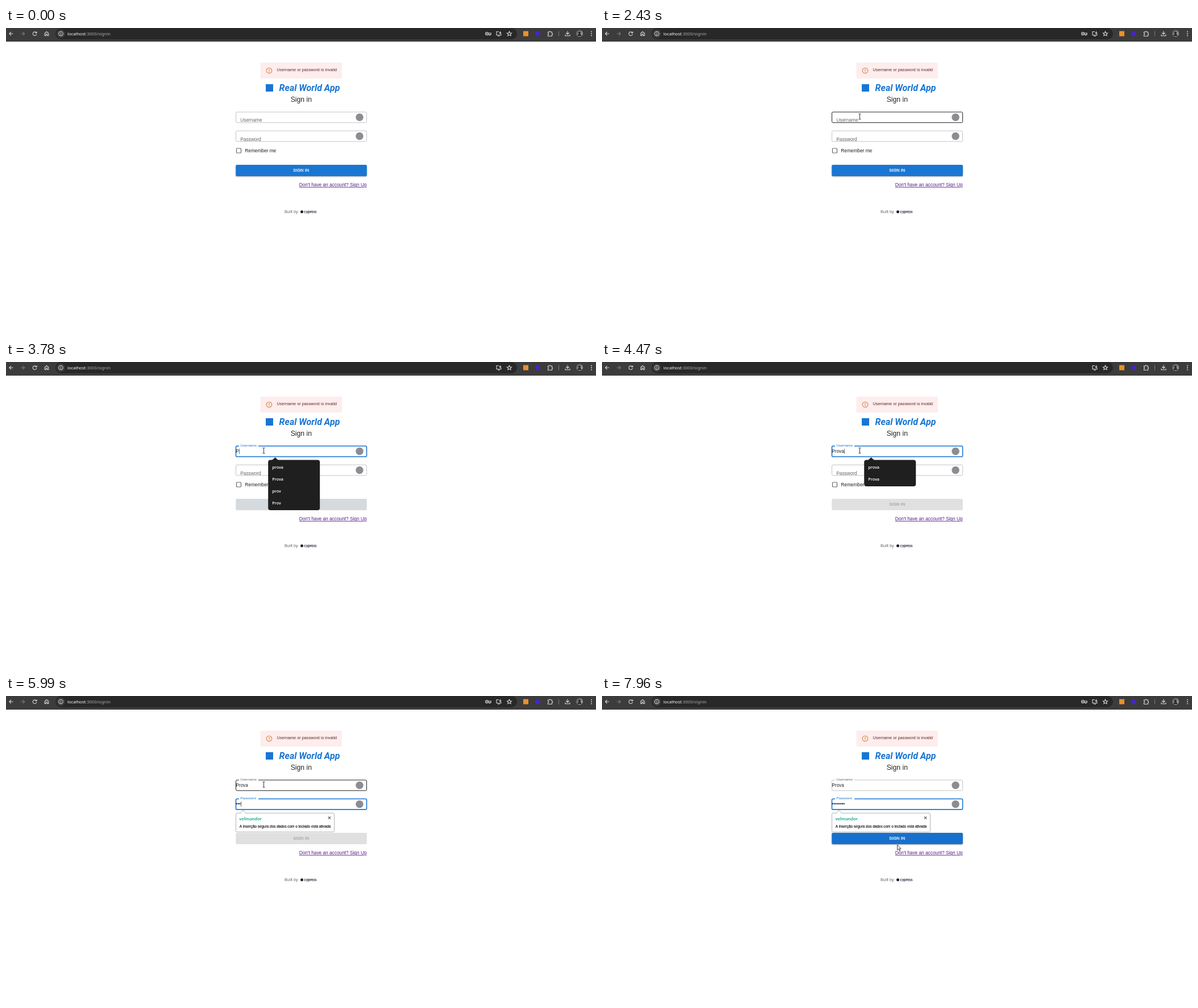
Recreate the animation shown at these times as an HTML page. Size 1038 by 539 pixels, loop 8000 ms.

```html
<!DOCTYPE html>
<html lang="en">
<head>
<meta charset="utf-8">
<title>Sign in</title>
<style>
html, body { margin: 0; width: 100%; height: 100%; overflow: hidden; background: #fff; }
svg { display: block; width: 1038px; height: 539px; }
text { font-family: "Liberation Sans", Arial, sans-serif; font-size: 8.3px; fill: #222; }
.mid { text-anchor: middle; }
.small { font-size: 7.2px; }
.ui, .ui text { font: 7.6px "Noto Sans", sans-serif; }
#menu text { font: 600 7.2px "Open Sans", sans-serif; fill: #fff; }
.icons { fill: none; stroke: #dadada; stroke-width: 1.1; }
.box { fill: none; }
</style>
</head>
<body>
<svg viewBox="0 0 1038 539">
  <defs>
    <linearGradient id="photo" x2="1" y2="1"><stop stop-color="#4a5058"/><stop offset="1" stop-color="#aab0b4"/></linearGradient>
  </defs>

  <!-- Browser bar -->
  <rect width="1038" height="24" fill="#3c3c3c"/>
  <rect x="87" width="812" height="20" rx="10" fill="#282828"/>
  <circle cx="96.5" cy="10" r="7.5" fill="#3c3c3c"/>
  <g class="icons">
    <path d="M12.5 10H6M9 6.8L5.8 10 9 13.2"/>
    <path d="M26 10h6.5M29.500 6.800l3.200 3.200-3.200 3.200" stroke="#7c7c7c"/>
    <path d="M53.300 8.300A3.300 3.300 0 1 0 53.800 10.800M54 6.200v2.600h-2.600"/>
    <path d="M68.200 9.200v4.300h2.200v-2.800h2.200v2.800h2.200V9.200L71.500 6.500Z"/>
    <circle cx="96.500" cy="10" r="3.700"/><path d="M96.500 9.500v2.700M96.500 7.700v1"/>
    <g id="key"><circle cx="846" cy="10" r="2.500"/><circle cx="846" cy="10" r=".5"/><path d="M848.500 9h4.700v2.200h-1.200v1.300h-2v-1.300h-1.500"/></g>
    <path d="M867 6.500h-4v6h8v-2M865 14.200h4M869.500 5.800v4M867.700 8.200l1.800 1.800 1.800-1.800"/>
    <path d="M885.500 6l1.200 2.700 2.900.2-2.200 1.900.7 2.900-2.600-1.600-2.600 1.600.7-2.900-2.200-1.900 2.900-.2Z"/>
    <path d="M953.500 7h2.200a1.200 1.200 0 0 1 2.400 0h2.400v2.500a1.200 1.200 0 0 1 0 2.400v2.300h-7v-2.500a1.200 1.200 0 0 0 0-2.400Z"/>
    <path d="M972.500 5.500v9" stroke="#777"/>
    <path d="M988 5.500v5.500M985.300 8.500L988 11.200l2.700-2.700M984 11.500v2.300h8v-2.300"/>
  </g>
  <g fill="#dadada"><circle cx="1030" cy="6.500" r="1"/><circle cx="1030" cy="10" r="1"/><circle cx="1030" cy="13.500" r="1"/></g>
  <rect x="910" y="5.500" width="9" height="9" fill="#e8912d"/>
  <circle cx="935.500" cy="10" r="4.500" fill="#4527c4"/>
  <circle cx="1009" cy="9.500" r="6" fill="url(#photo)"/>
  <path d="M1005.500 14q.5-3.500 3.500-3.500t3.500 3.500Z" fill="#222"/><circle cx="1009" cy="8.500" r="2" fill="#222"/>
  <text class="ui" x="108" y="12.800" style="fill:#aaa"><tspan fill="#fff">localhost</tspan>:3000/signin</text>

  <!-- Alert and heading -->
  <rect x="447.500" y="61" width="143.500" height="28" rx="2" fill="#fdeded"/>
  <g fill="none" stroke="#d9803f"><circle cx="463" cy="75" r="4.800" stroke-width="1.100"/><path d="M463 72v3.700M463 76.700v1.200" stroke-width="1.200"/></g>
  <text x="476.500" y="76.200" style="font-size:7.150px;letter-spacing:.08px;fill:#5f2120">Username or password is invalid</text>
  <rect x="457" y="99" width="13" height="13" fill="#1976d2"/>
  <text class="mid" x="534" y="111" style="font:italic 700 16px Roboto,sans-serif;fill:#1976d2">Real World App</text>
  <text class="mid" x="519.300" y="129.800" style="font-size:12.200px">Sign in</text>

  <!-- Form -->
  <g id="user"></g>
  <g id="pass"></g>
  <rect x="405.500" y="212" width="8" height="8" rx="1" fill="none" stroke="#666" stroke-width="1.200"/>
  <text x="420.300" y="219">Remember me</text>
  <rect id="button" x="404.300" y="241" width="230.500" height="20" rx="2"/>
  <text id="submit" class="mid" x="519.300" y="253" stroke-width=".25" style="font-size:7.200px;letter-spacing:.2px;fill:inherit">SIGN IN</text>
  <text x="634.500" y="279" text-anchor="end" text-decoration="underline" style="fill:#551a8b">Don't have an account? Sign Up</text>
  <text class="small" x="490" y="326.200" style="fill:#666">Built by</text>
  <circle cx="520.500" cy="323.700" r="2.500" fill="#1b1e2e"/>
  <text x="524.500" y="326" style="font:700 6.500px Lato,sans-serif;fill:#1b1e2e">cypress</text>

  <rect id="caret" width=".8" height="9" fill="#444"/>
  <g id="notice">
    <path d="M406.500 206.300H412.500L417 201.200 421.500 206.300H575.500a2 2 0 0 1 2 2V237.500a2 2 0 0 1-2 2H406.500a2 2 0 0 1-2-2V208.300a2 2 0 0 1 2-2Z" fill="#fff" stroke="#aaa" stroke-width=".9"/>
    <text x="410.300" y="218.500" style="font:700 8.400px Lato,sans-serif;fill:#1fa890">velmandor</text>
    <path d="M566.800 212.300l4.400 4.400m0-4.400l-4.400 4.400" stroke="#555" stroke-width="1.100"/>
    <text x="410.800" y="232" stroke="#000" stroke-width=".12" style="font-size:6.400px;fill:#000">A Inserção segura dos dados com o teclado está ativada</text>
  </g>
  <circle id="click" cx="453" cy="156" r="7" fill="#ffee1a"/>
  <g id="menu"></g>
  <path id="arrow" d="M0 0V9.300L2.200 7.300 3.700 10.800 5.200 10.200 3.700 6.900H6.600Z" fill="#fff" stroke="#111" stroke-width=".8"/>
  <path id="beam" d="M-2-5Q0-5 0-4Q0-5 2-5M0-4V4M-2 5Q0 5 0 4Q0 5 2 5" fill="none" stroke="#222" stroke-width=".9"/>
</svg>
<script>
const $ = id => document.getElementById(id);
const clamp = v => Math.max(0, Math.min(1, v));
const easeOut = v => 1 - (1 - clamp(v)) ** 2;
const mix = (a, b, p) => a + (b - a) * p;
const blend = (a, b, p) => `rgb(${a.map((v, i) => Math.round(mix(v, b[i], p)))})`;
const set = (el, attrs) => { for (const k in attrs) el.setAttribute(k, attrs[k]); };
const show = (el, on) => { el.style.display = on ? '' : 'none'; };
const count = (times, t) => times.filter(s => t >= s).length;

const BLUE = '#1976d2', LOOP = 8000;
const FOCUS = 2620, TYPE = 3570, TAB = 4780, SECRET = 5660, VALID = 6170;
const nameKeys = [TYPE, 3840, 4080, 4280, 4470];
const secretKeys = [SECRET, 5790, 5990, VALID, 6370, 6870, 7190, 7370];
const entry = 'Prova';
const allNames = ['Corin48', 'brunoft61', 'Owner', 'ruben.f@brisa.example', 'prova', 'Prova'];
const matches = ['prova', 'Prova', 'prov', 'Prov'];

// Pointer positions: time, x, y
const path = [
  [1100, 1032, 535], [1165, 1024, 531], [1230, 1018, 529.5],
  [1430, 790, 440], [1490, 590, 345], [1560, 489, 295], [1620, 482, 283],
  [1680, 476, 268], [1740, 471, 250], [1805, 467, 232], [1870, 463, 213],
  [1930, 460, 195], [1990, 458, 180], [2055, 456, 168], [2120, 454, 160],
  [2180, 453, 155.5], [2430, 453.5, 156],
  [7810, 470, 187], [7885, 507, 243], [7960, 519.5, 262]
];

function makeField(id, label, y) {
  $(id).innerHTML = `<rect class="box" x="404.5" y="${y}" width="230" height="18.7" rx="2"/>
    <rect x="410" y="${y - 1.5}" width="34" height="3" fill="#fff"/>
    <text>${label}</text><text x="404.3" y="${y + 12}" style="font-size:8.2px"></text>
    <circle cx="622" cy="${y + 9.3}" r="6.7" fill="#8c8c92"/>`;
  const [box, notch, tag, value] = $(id).children;
  return { y, box, notch, tag, value };
}

function drawField(f, rise, focused, hovered, blueTag, value) {
  set(f.box, {
    stroke: focused ? BLUE : hovered ? '#222' : '#c4c4c4',
    'stroke-width': focused ? 1.6 : 1
  });
  show(f.notch, rise > 0);
  set(f.tag, { transform: `translate(412.3 ${f.y + mix(17.3, 0.7, rise)}) scale(${mix(1, 0.75, rise)})` });
  f.tag.style.fill = blueTag ? BLUE : '#666';
  f.value.textContent = value;
}

const user = makeField('user', 'Username', 148);
const pass = makeField('pass', 'Password', 181.2);
let menuKey;

function drawMenu(t) {
  const fade = clamp((t - TAB) / 180);
  show($('menu'), t >= FOCUS && fade < 1);
  const items = t < TYPE ? allNames : t < nameKeys[4] ? matches : matches.slice(0, 2);
  if (menuKey !== items.length) {
    menuKey = items.length;
    const w = menuKey > 4 ? 120.5 : 91;
    $('menu').innerHTML = `<path d="M468 173L473.5 168 479 173Z" fill="#1f1f1f"/>
      <rect x="461.2" y="172.5" width="${w}" height="${menuKey * 21 + 4.5}" rx="4" fill="#1f1f1f"/>` +
      items.map((s, i) => `<text x="468.3" y="${188.3 + i * 21}">${s}</text>`).join('');
  }
  const s = 1 - 0.045 * fade;
  set($('menu'), {
    opacity: Math.min(clamp((t - FOCUS + 60) / 120), 1 - fade),
    transform: `translate(506.5 196) scale(${s}) translate(-506.5 -196)`
  });
}

function draw(t) {
  const step = path[count(path.map(p => p[0]), t) - 1];
  const [, px, py] = step || [0, -50, -50];
  const inX = px > 404 && px < 635;
  const over = (top, bottom) => inX && py > top && py < bottom;
  const overUser = over(147, 167), overPass = over(181, 200);
  const beam = overUser || overPass;
  show($('beam'), beam);
  show($('arrow'), !beam && step);
  set($(beam ? 'beam' : 'arrow'), { transform: `translate(${px} ${py})` });

  const typed = entry.slice(0, count(nameKeys, t));
  const hidden = '•'.repeat(count(secretKeys, t));
  const inUser = t >= FOCUS && t < TAB, inPass = t >= TAB;
  drawField(user, easeOut((t - FOCUS) / 240), inUser, overUser, t >= FOCUS && t < 4980, typed);
  drawField(pass, easeOut((t - TAB) / 200), inPass, overPass, inPass, hidden);

  const active = inPass ? pass : user;
  show($('caret'), (t >= TYPE && t < TAB) || (t >= SECRET && t < 7370));
  set($('caret'), { x: 404.5 + active.value.getComputedTextLength(), y: active.y + 4.7 });

  const off = t < VALID ? easeOut((t - TYPE - 20) / 250) : 1 - easeOut((t - VALID) / 250);
  const base = over(241, 263) ? [23, 112, 206] : [25, 118, 210];
  set($('button'), { fill: blend(base, [224, 224, 224], off) });
  $('button').style.filter = `drop-shadow(0 1px 1px rgba(0,0,0,${0.35 * (1 - off)}))`;
  const ink = blend([255, 255, 255], [166, 166, 166], off);
  $('submit').style.fill = $('submit').style.stroke = ink;

  show($('key'), t < TYPE || t >= SECRET);
  show($('notice'), t >= 5000);
  show($('click'), t >= FOCUS && t < 2940);
  set($('click'), { opacity: clamp(1 - (t - FOCUS) / 320) });
  drawMenu(t);
}

function tick() {
  draw(performance.now() % LOOP);
  requestAnimationFrame(tick);
}
tick();
</script>
</body>
</html>
```
